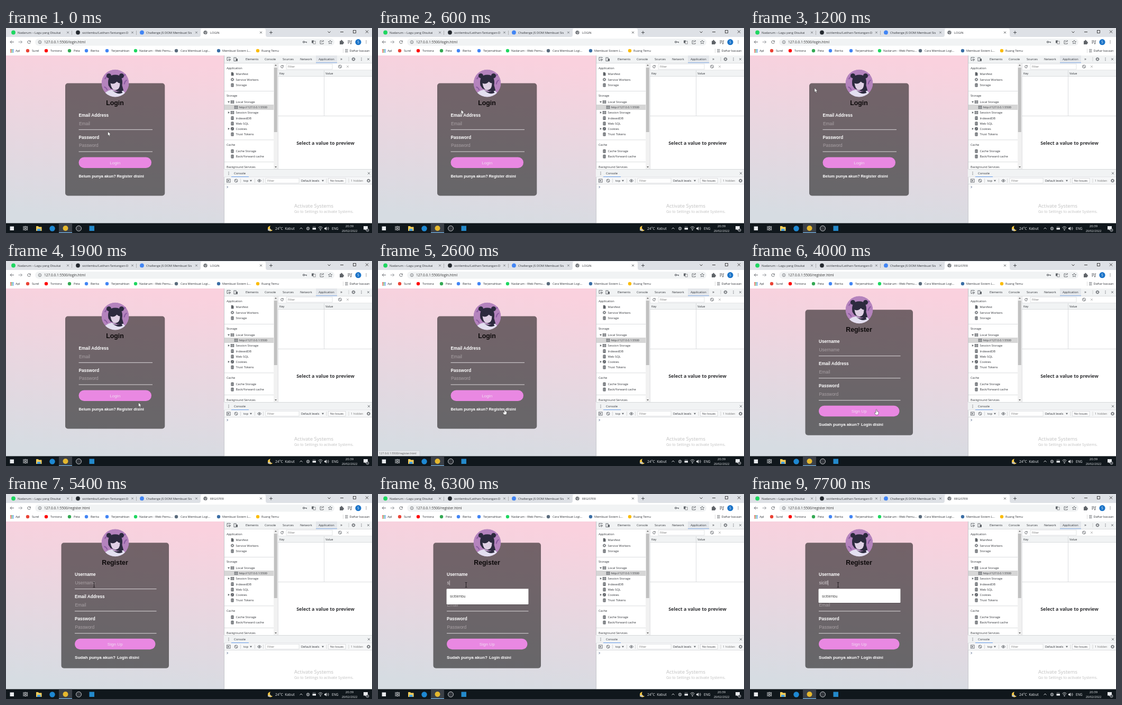
An HTML page for the animation above (8000 ms loop, 692 by 388 pixels).

```html
<!DOCTYPE html>
<html lang="id">
<head>
<meta charset="utf-8">
<title>Login dan Register</title>
<style>
html, body { margin: 0; width: 100%; height: 100%; overflow: hidden; background: #fff; }
svg { display: block; width: 692px; height: 388px; }
text { font-family: "Open Sans", "Noto Sans", sans-serif; white-space: pre; }
.form text { font-family: "Liberation Sans", Arial, sans-serif; }
</style>
</head>
<body>
<svg id="stage" viewBox="0 0 692 388" xmlns="http://www.w3.org/2000/svg"></svg>
<script>
const LOOP = 8000, STEP = 100;
const USER = 'sicitlembu';
const KEY_TIMES = [6300, 6600, 6900, 7200, 7500, 7700];
const GREY = '#5f6368';

const text = (x, y, s, size = 6, fill = '#303338', extra = '') =>
  `<text x="${x}" y="${y}" font-size="${size}" fill="${fill}" ${extra}>${s}</text>`;
const rect = (x, y, w, h, fill, extra = '') =>
  `<rect x="${x}" y="${y}" width="${w}" height="${h}" fill="${fill}" ${extra}/>`;
const disc = (x, y, r, fill, extra = '') =>
  `<circle cx="${x}" cy="${y}" r="${r}" fill="${fill}" ${extra}/>`;
const line = (d, stroke = GREY, w = .9, extra = '') =>
  `<path d="${d}" fill="none" stroke="${stroke}" stroke-width="${w}" ${extra}/>`;
const shape = (d, fill) => `<path d="${d}" fill="${fill}"/>`;
const group = (id, body, extra = '') => `<g id="${id}" ${extra}>${body}</g>`;
const cross = (x, y, r = 2, c = GREY, w = .8) =>
  line(`M${x - r} ${y - r}l${2 * r} ${2 * r}m0 ${-2 * r}l${-2 * r} ${2 * r}`, c, w);
const dots = (x, y, c = GREY) => [-2.4, 0, 2.4].map(d => disc(x, y + d, .7, c)).join('');
const reload = (x, y, r = 2.8, c = GREY) =>
  line(`M${x + r * .8} ${y - r * .6}A${r} ${r} 0 1 0 ${x + r} ${y + r * .3}`, c, 1) +
  shape(`M${x + r + .3} ${y - r - .3}v${r}h${-r}z`, c);
const gear = (x, y, r = 2.2) =>
  disc(x, y, r, 'none', `stroke="${GREY}" stroke-width="1.2"`) +
  disc(x, y, r + .9, 'none', `stroke="${GREY}" stroke-width=".9" stroke-dasharray="1.1 1.3"`);
const block = (x, y) =>
  disc(x, y, 2.9, 'none', `stroke="${GREY}" stroke-width=".9"`) + line(`M${x - 2} ${y - 2}l4 4`);
const triangle = (x, y, open) =>
  shape(open ? `M${x - 2} ${y - 1.3}h4l-2 3z` : `M${x - 1.2} ${y - 2}v4l3 -2z`, GREY);
const globe = (x, y) => disc(x, y, 3.6, GREY) +
  line(`M${x - 2.6} ${y - 1}q2 2 3 0t2 1M${x - 1} ${y + 3}l1 -2 2 .5`, '#fff', .8);

const treeIcons = {
  db: (x, y) => rect(x - 2.8, y - 3.3, 5.6, 6.8, GREY, 'rx="1.5"') +
    line(`M${x - 2.8} ${y - 1}h5.6m-5.6 2.3h5.6`, '#fff', .6),
  grid: (x, y) => rect(x - 3.3, y - 2.8, 6.6, 5.6, GREY) +
    line(`M${x - 3.3} ${y - .8}h6.6m-6.6 1.8h6.6M${x} ${y - 2.8}v5.6`, '#fff', .5),
  file: (x, y) => shape(`M${x - 2.3} ${y - 3.2}h3l1.8 1.8v4.6h-4.8z`, GREY),
  gear: (x, y) => gear(x, y, 1.9),
  cookie: (x, y) => disc(x, y, 3.1, GREY) + disc(x + .8, y - .9, .6, '#fff') + disc(x - 1, y + .6, .6, '#fff')
};

function browserChrome() {
  const tabs = [
    [14, '#1ed760', 'Nadarum – Lagu yang Disukai', 117],
    [136, '#24292f', `${USER}/Latihan-Tantangan-D`, 239],
    [257, '#4285f4', 'Challenge JS DOM Membuat Sis', 360]
  ].map(([x, color, title, close]) =>
    disc(x, 8.5, 3.9, color) + text(x + 8, 10.5, title, 5.9) + cross(close, 8.5, 1.8)).join('');
  const bookmarks = [
    [41, '#ea4335', 'Surel', 49], [76, '#ff0000', 'Tontona', 84], [120, '#34a853', 'Peta', 128],
    [152, '#4285f4', 'Berita', 160], [191, '#4285f4', 'Terjemahkan', 199],
    [245, '#1ed760', 'Nadarum - Web Pemu...', 252], [322, '#5a6b7c', 'Cara Membuat Logi...', 330],
    [402, '#3b6ea5', 'Membuat Sistem L...', 409], [476, '#fbbc04', 'Ruang Temu', 483]
  ].map(([x, color, label, lx]) => disc(x, 43, 3.2, color) + text(lx, 45.1, label, 5.7)).join('');
  let apps = '';
  for (let i = 0; i < 9; i++)
    apps += rect(8 + i % 3 * 2.4, 40 + Math.floor(i / 3) * 2.4, 1.7, 1.7, ['#ea4335', '#34a853', '#4285f4'][i % 3]);
  return rect(0, 0, 692, 17, '#dee1e6') + rect(0, 17, 692, 35, '#fff') + tabs +
    line('M124.5 5v8M246.5 5v8', '#999', .7) +
    shape('M364 17q4 0 4 -4v-9q0 -3 3 -3h117q3 0 3 3v9q0 4 4 4z', '#fff') +
    group('favicon', globe(377, 8.5)) +
    group('spinner', line('M375 4.8a4 4 0 0 1 3 -.4', '#aab0b8', .9)) +
    '<text id="title" x="386" y="10.6" font-size="5.8" fill="#303338"></text>' +
    cross(482, 8.5, 1.9, '#3c4043') + line('M498 8.5h6m-3 -3v6', '#3c4043') +
    line('M608.5 6.5l2.5 2.5 2.5 -2.5M632 7.5h6', '#222') +
    rect(656.5, 4.5, 5, 5, 'none', 'stroke="#222" stroke-width=".8"') + cross(682.5, 7, 2.6, '#222') +
    line('M15 26.5h-7m3 -3l-3 3 3 3') + line('M23.5 26.5h7m-3 -3l3 3 -3 3', '#8b8f94') +
    group('reload', reload(43.5, 26.5)) + group('stop', cross(43.5, 26.5, 2.6, GREY, 1)) +
    rect(55, 20, 566, 13.5, '#f1f3f4', 'rx="6.7"') +
    disc(64, 26.7, 2.8, 'none', `stroke="${GREY}" stroke-width=".8"`) + line('M64 26.2v2.2m0 -3.7v.7', GREY, .8) +
    '<text id="url" x="72" y="29" font-size="6.6" fill="#333"></text>' +
    group('key', disc(563, 26.5, 1.5, 'none', `stroke="${GREY}" stroke-width="1.2"`) +
      line('M564.5 26.5h4.5m-1 0v1.8', GREY, 1.2)) +
    rect(578, 23.5, 4, 5, GREY) + rect(581, 25, 4, 5, '#fff', `stroke="${GREY}" stroke-width=".7"`) +
    line('M597 24h-3v6h6v-2M596.5 27.5q0 -3 4 -3m-1.5 -1.7l1.7 1.7 -1.7 1.7') +
    line('M613 23l1.1 2.4 2.6 .2 -2 1.8 .6 2.6 -2.3 -1.4 -2.3 1.4 .6 -2.6 -2 -1.8 2.6 -.2z', GREY, .8) +
    shape('M631 24.5h2q0 -2 1.4 -2t1.4 2h1.7v2q1.6 0 1.6 1.4t-1.6 1.4v1.6h-6.5z', GREY) +
    line('M646 24h5m-5 2.3h5m-5 2.3h3m3.5 1.2v-5.800h1.8', GREY, 1) + disc(652, 29.6, 1.1, GREY) +
    disc(666, 26.7, 5.6, '#1a73c8') + text(666, 29, 'S', 6.2, '#fff', 'text-anchor="middle"') + dots(681, 26.7) +
    apps + text(18, 45.1, 'Apl', 5.7) + bookmarks + line('M637.5 39v8', '#ccc', .7) +
    line('M641 40.7h5.5m-5.5 2.3h5.5m-5.5 2.3h5.5', GREY, .9) + text(649.5, 45.1, 'Daftar bacaan', 5.8);
}

function devtools() {
  const rule = (y, x = 413, w = 279) => rect(x, y, w, .7, '#ccced2');
  const tabs = [['Elements', 453], ['Console', 489], ['Sources', 523], ['Network', 556], ['Application', 591]]
    .map(([s, x]) => text(x, 61.2, s, 5.7)).join('');
  const heads = [['Application', 75.5], ['Storage', 128], ['Cache', 220.5], ['Background Services', 262.5]]
    .map(([s, y]) => text(417, y + 2, s, 5.7)).join('');
  const rows = [
    ['file', 'Manifest', 87], ['gear', 'Service Workers', 97.5], ['db', 'Storage', 108],
    ['grid', 'Local Storage', 140, true], ['grid', 'Session Storage', 160, false],
    ['db', 'IndexedDB', 170.5], ['db', 'Web SQL', 180.7], ['cookie', 'Cookies', 190.7, false],
    ['db', 'Trust Tokens', 201], ['db', 'Cache Storage', 233], ['db', 'Back/forward cache', 243]
  ].map(([icon, s, y, open]) => treeIcons[icon](428, y) + text(434.5, y + 2, s, 5.8) +
    (open === undefined ? '' : triangle(421, y, open))).join('');
  return rect(412, 52, 280, 317.5, '#fff') + rect(412, 52, 280, 14, '#f1f3f4') + rule(66) +
    rect(412, 52, .8, 317, '#b8bbc0') +
    line('M424 57v-1.5h-6v6h2.5m.5 -3.2l4 1.5 -1.8 .8 -.7 1.8z') +
    rect(431, 56, 4, 6.5, 'none', `stroke="${GREY}" stroke-width=".9"`) + rect(435, 58, 3, 4.7, GREY) +
    rect(586, 52, 40, 14, '#e4e7eb') + tabs + rect(586, 65.4, 40, .8, '#6d9fe8') +
    text(632, 61.3, '»', 8) + line('M648 55v8', '#ccc') + gear(657, 59) + dots(672, 59) + cross(685, 59) +
    rect(413, 145, 93, 10, '#d6d6d6') + heads + rows + treeIcons.grid(435, 150) +
    text(440.5, 152, 'http://127.0.0.1:5500', 5.5) +
    rule(119, 413, 93) + rule(211.5, 413, 93) + rule(253, 413, 93) +
    rect(506, 67, 7.5, 200, '#f1f1f1') + rect(506.8, 75, 6, 122, '#c1c1c1') +
    shape('M508 71.5h4l-2 -2.5zM508 262h4l-2 2.5z', '#666') + rect(513.8, 67, .8, 200, '#ccced2') +
    reload(522, 73, 2.4) + rect(530, 68.2, 87, 9.8, '#fff', 'stroke="#d5d7da" stroke-width=".7"') +
    text(533, 75, 'Filter', 5.7, '#777') + block(631.5, 73) + cross(646, 73, 2, '#aaa') + rule(79.5, 514, 178) +
    rect(514.5, 80, 178, 11, '#f1f3f4') + rule(91, 514, 178) + text(517, 87.6, 'Key', 5.7) + text(604, 87.6, 'Value', 5.7) +
    rect(601, 80, .7, 86, '#ccced2') + rule(166, 514, 178) +
    text(604, 221, 'Select a value to preview', 8.9, '#303134', 'font-weight="700" text-anchor="middle"') +
    rect(412, 267, 280, 15, '#f1f3f4') + rule(267) + rule(281.7) + dots(421, 275) + text(431, 277.2, 'Console', 5.9) +
    rect(426, 281.2, 33, .9, '#4a8ae8') + cross(686, 275, 2.1) +
    rect(412.8, 282.4, 280, 12.6, '#f6f7f8') + rule(295) +
    rect(417.5, 286, 6.5, 6, 'none', `stroke="${GREY}" stroke-width=".9"`) + triangle(420.5, 289, false) + block(435, 289) +
    line('M443.5 285v8M470.5 285v8M486.5 285v8M606 285v8M648 285v8', '#ccc', .7) +
    text(449, 291, 'top', 5.8) + triangle(463, 289, true) +
    line('M475.5 289q3.5 -4.8 7 0q-3.5 4.8 -7 0z', GREY, 1) + disc(479, 289, 1.2, GREY) +
    rect(491, 284.2, 63, 9.4, '#fff', 'stroke="#d5d7da" stroke-width=".7"') + text(494, 291, 'Filter', 5.7, '#777') +
    text(558, 291, 'Default levels', 5.5) + triangle(599, 289, true) +
    rect(609.5, 284.3, 32.5, 9.2, '#fff', 'stroke="#ccced2" stroke-width=".7"') + text(613, 291, 'No Issues', 5.6) +
    text(652, 291, '1 hidden', 5.7, '#777') + gear(685.5, 289) +
    line('M417.5 299l2 2 -2 2', '#54698c', 1) +
    text(545, 339.5, 'Activate Systems', 9.5, '#bfbfbf') + text(545, 350, 'Go to Settings to activate Systems.', 7, '#bfbfbf');
}

function taskbar() {
  const white = '#e8eaed';
  return rect(0, 369.4, 692, 19, '#10171c') + rect(7.5, 375.5, 7.5, 7.5, white) +
    line('M33 375v8m2 -7.5h3.5v2.7h-3.5zm0 4.3h3.5v2.7h-3.5zM40.5 375v8', white, .9) +
    shape('M57 375h4l1 1.5h5.5v7.5h-10.5z', '#f8cf5a') + rect(59, 380, 6.5, 4, '#4aa3df') +
    disc(87.5, 379.5, 5.2, '#1e88d2') + rect(100, 369.4, 25, 19, '#3b4047') + disc(112.5, 379, 5, '#e5b82e') +
    rect(100, 386.8, 25, 1.2, '#76b9ed') + disc(137.5, 379.3, 5, '#30343a', 'stroke="#c9ccd0" stroke-width="1"') +
    rect(157.5, 374.5, 9.5, 9.5, '#2489ca') +
    shape('M500 374.5a5 5 0 1 0 4 8a5 5 0 0 1 -4 -8z', '#f6c945') + rect(495, 381, 6, 2.6, '#bfc6cf', 'rx="1.3"') +
    text(509, 382, '24°C  Kabut', 6.7, white) + line('M555.5 380.5l2.5 -2.5 2.5 2.5', white) +
    disc(571, 379.5, 2.6, 'none', `stroke="${white}"`) + disc(571, 379.5, .9, white) +
    rect(579.5, 378, 6.5, 3.6, white) + line('M581 377v-1.5m3 1.5v-1.5', white) +
    line('M592 380q2.5 -3 5 0M590.5 378q4 -4 8 0', white) + disc(594.5, 382, 1, white) +
    shape('M602 378h2l2 -2v7l-2 -2h-2z', white) + line('M607.5 377.5q1.5 2 0 4m1.5 -5q2.5 3 0 6', white, .7) +
    text(616, 382, 'ENG', 6.2, white) +
    text(649.5, 377.3, '20:39', 6, white, 'text-anchor="middle"') +
    text(649.5, 386, '20/02/2022', 5.6, white, 'text-anchor="middle"') +
    shape('M676 375h8v6.5h-3.5l-1.500 1.500v-1.500h-3z', white) + disc(683.5, 382.5, 2.6, '#4a4f55', `stroke="${white}" stroke-width=".6"`);
}

function avatar(cy) {
  const hair = '#2c2a3e';
  return `<g transform="translate(206.5 ${cy})" clip-path="url(#round)">` + disc(0, 0, 26, '#b483bd') +
    line('M-20 -8q4 -3 5 -9M17 2q1 -6 5 -8M15 -14q4 -1 6 -5M-21 7q4 1 6 6', '#8d5ca3', 2.2) +
    disc(-12, -14, 4.5, hair) + disc(12, -14, 4.5, hair) +
    shape('M-13 4Q-16 -16 0 -16T13 4L16 15H4L-9 10z', hair) +
    shape('M-9 0Q-2 3 3 -3Q6 0 9 0Q9 12 1 13T-9 0z', '#dfd0e4') +
    shape('M-20 19Q-10 11 -4 13Q4 20 15 14L20 20V27H-20z', '#e3dff0') +
    shape('M-6 13Q2 20 11 13L14 18Q4 23 -6 13z', hair) + '</g>';
}

function form(page) {
  const { id, heading, card, fields, x, right, button, action, ask, askSize, link, linkX, footY } = page;
  const white = '#fff';
  return group(id,
    rect(card.x, card.y, card.w, card.h, '#000', 'fill-opacity=".53" rx="5"') + avatar(card.y) +
    text(206, card.y + 41.5, heading, 12.4, '#0b0809', 'font-weight="700" text-anchor="middle"') +
    fields.map(([label, hint, y]) =>
      text(x, y - 24.5, label, 8.2, white, 'font-weight="700"') +
      text(x + .5, y - 8.6, hint, 8.4, '#a9a1a5', 'class="hint"') +
      rect(x, y - .5, right - x, 1, '#dcd7da')).join('') +
    rect(x, button, right - x - 2, 20.5, '#e988e2', 'rx="10.2"') +
    text((x + right - 2) / 2, button + 13, action, 8.1, '#f1dff1', 'text-anchor="middle"') +
    text(x, footY, ask, askSize, white, 'font-weight="700"') +
    text(linkX, footY, link, 7.45, white, 'font-weight="700"'), 'class="form"');
}

const login = {
  id: 'login', heading: 'Login', card: { x: 112, y: 104.5, w: 188.3, h: 213 }, x: 137.5, right: 277,
  fields: [['Email Address', 'Email', 192.3], ['Password', 'Password', 234]],
  button: 244.5, action: 'Login', ask: 'Belum punya akun?', askSize: 7.4,
  link: 'Register disini', linkX: 209.5, footY: 283
};
const register = {
  id: 'register', heading: 'Register', card: { x: 104.5, y: 92.3, w: 203.5, h: 237.5 }, x: 130, right: 284.5,
  fields: [['Username', 'Username', 179.7], ['Email Address', 'Email', 221.7], ['Password', 'Password', 263.7]],
  button: 273.8, action: 'Sign Up', ask: 'Sudah punya akun?', askSize: 8.1,
  link: 'Login disini', linkX: 210, footY: 312
};

const defs = `<defs>
  <linearGradient id="sky" gradientUnits="userSpaceOnUse" x1="225" y1="52" x2="190" y2="369">
    <stop offset="0" stop-color="#fad1de"/><stop offset="1" stop-color="#d6dce2"/></linearGradient>
  <clipPath id="round"><circle r="26"/></clipPath></defs>`;

document.getElementById('stage').innerHTML = defs + browserChrome() + rect(0, 52, 412, 318, 'url(#sky)') +
  form(login) + form(register) +
  group('typing', '<text id="typed" x="130.5" y="171.1" font-size="8.4" fill="#d6d0d3"></text>' +
    rect(0, 163.5, .7, 9.5, '#e6e1e4', 'id="caret"'), 'class="form"') +
  group('suggest', rect(129, 180.5, 156, 29, '#000', 'id="shadow" fill-opacity=".22" rx="1.5"') +
    rect(129.5, 180, 155, 29, '#fff', 'id="list" rx="1"') + text(136, 195.6, USER, 6.2, '#333')) +
  devtools() +
  group('status', rect(-1, 359, 80, 10.5, '#e6e8eb', 'stroke="#c3c6ca" stroke-width=".7"') +
    text(2, 366.2, '127.0.0.1:5500/register.html', 5.4, '#555')) +
  taskbar() +
  group('cursor',
    group('arrow', '<path d="M0 0V8L1.8 6.3 3.1 9.2 4.5 8.6 3.2 5.8H5.7Z" fill="#fff" stroke="#222" stroke-width=".45"/>') +
    group('hand', '<path d="M-.9 .8Q0 -.5 .9 .8V4L4 5V8L3 10.8H-1.5L-3.7 6.5Q-3 5.3 -.9 7Z" fill="#fff" stroke="#222" stroke-width=".5"/>') +
    group('beam', line('M-1.8 -4.5H-.5Q0 -4.5 0 -4T.5 -4.5H1.8M0 -4V4M-1.8 4.5H-.5Q0 4.5 0 4T.5 4.5H1.8', '#1d181b', .9)));

const el = {};
document.querySelectorAll('#stage [id]').forEach(node => el[node.id] = node);
const show = (node, on) => node.setAttribute('visibility', on ? 'visible' : 'hidden');
const usernameHint = el.register.querySelector('.hint');

const pointerPath = [
  [0, 192.5, 196], [1200, 122, 113.5], [1900, 250.5, 268], [2700, 239, 280.5],
  [4500, 239, 280.5], [5400, 166.5, 172], [LOOP, 166.5, 172]
];

function pointerAt(t) {
  const i = pointerPath.findIndex(p => p[0] > t);
  const [t0, x0, y0] = pointerPath[i - 1], [t1, x1, y1] = pointerPath[i];
  const u = (t - t0) / (t1 - t0), e = u * u * (3 - 2 * u);
  return [x0 + (x1 - x0) * e, y0 + (y1 - y0) * e];
}

function pointerKind(page, x, y) {
  const inX = x > page.x && x < page.right;
  if (inX && page.fields.some(f => y > f[2] - 19 && y < f[2])) return 'beam';
  const onButton = inX && y > page.button && y < page.button + 20.5;
  const onLink = x > page.linkX && x < page.linkX + 52 && y > page.footY - 8 && y < page.footY + 2;
  return onButton || onLink ? 'hand' : 'arrow';
}

function render(time) {
  const t = Math.floor(time / STEP) * STEP;
  const registering = t >= 4000, loading = t >= 3200 && !registering;
  const page = registering ? register : login;
  show(el.login, !registering);
  show(el.register, registering);
  show(el.favicon, !loading);
  show(el.spinner, loading);
  show(el.reload, !loading);
  show(el.stop, loading);
  el.title.textContent = page.heading.toUpperCase();
  el.url.textContent = `127.0.0.1:5500/${page.id}.html`;
  show(el.key, t < 6400);

  const count = KEY_TIMES.filter(k => t >= k).length;
  el.typed.textContent = USER.slice(0, count);
  usernameHint.setAttribute('visibility', registering && !count ? 'inherit' : 'hidden');
  el.caret.setAttribute('x', 130.7 + (count ? el.typed.getComputedTextLength() : 0));
  show(el.caret, t >= 5600 && (t < 6100 || count > 0));
  show(el.suggest, count > 0);
  const height = t < 6400 ? 29 : 26;
  el.list.setAttribute('height', height);
  el.shadow.setAttribute('height', height + .5);

  const [x, y] = pointerAt(t), kind = pointerKind(page, x, y);
  el.cursor.setAttribute('transform', `translate(${x} ${y})`);
  for (const name of ['arrow', 'hand', 'beam']) show(el[name], name === kind);
  show(el.status, !registering && t >= 1900 && kind === 'hand');
}

const start = performance.now();
function tick() {
  render((performance.now() - start) % LOOP);
  requestAnimationFrame(tick);
}
tick();
</script>
</body>
</html>
```
